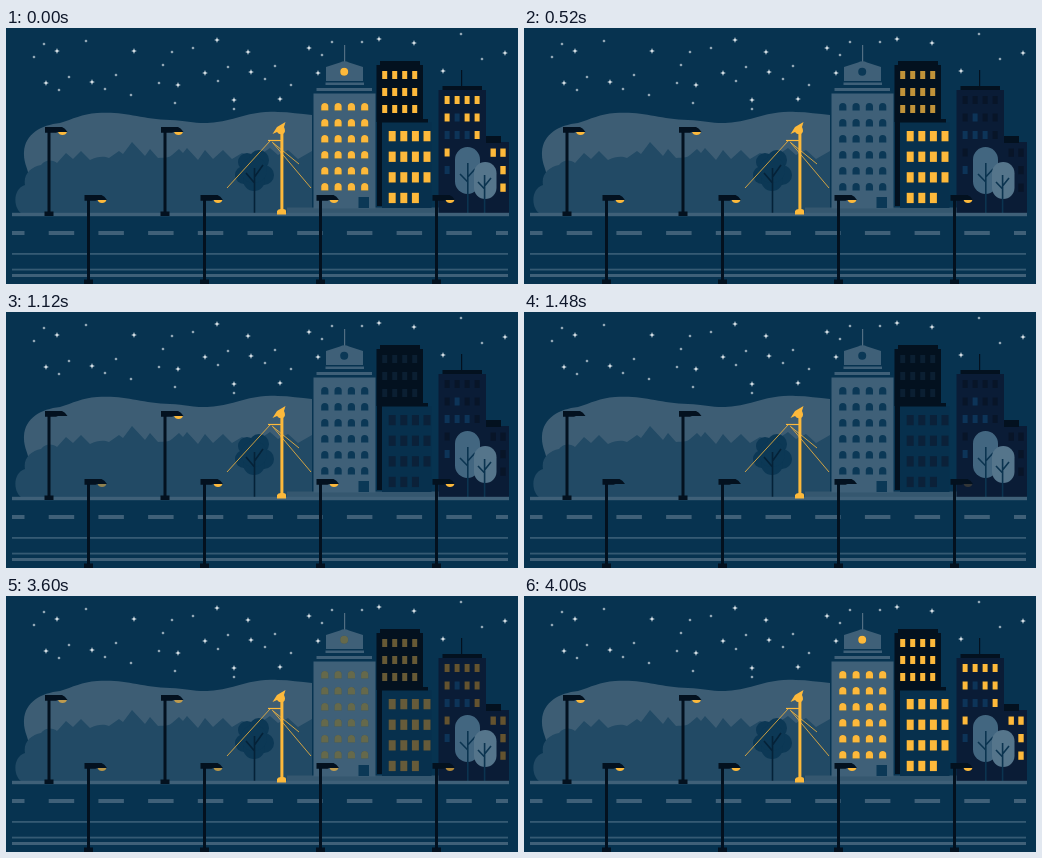
An HTML page for the animation above (4.8 s loop, 512 px wide and 256 px high).

```html
<!DOCTYPE html>
<html lang="en">
<head>
<meta charset="utf-8">
<title>City lights</title>
<style>
html, body { margin: 0; width: 100%; height: 100%; overflow: hidden; background: #073350; }
svg { display: block; width: 100vw; height: 100vh; }
</style>
</head>
<body>
<svg id="city" viewBox="0 0 512 256" xmlns="http://www.w3.org/2000/svg"></svg>
<script>
const LOOP = 4800, STEP = 40;
const C = {
  sky: '#073350', haze: '#3d5d74', hill: '#224a65', black: '#03111f',
  navy: '#0a1c36', gold: '#fdb93b', stone: '#3f6078'
};
const svg = document.getElementById('city');
const lights = [];

function add(tag, attrs) {
  const el = document.createElementNS(svg.namespaceURI, tag);
  for (const k in attrs) el.setAttribute(k, attrs[k]);
  return svg.appendChild(el);
}
const path = (d, fill, more) => add('path', { d, fill, ...more });
const line = (d, stroke, width) => path(d, 'none', { stroke, 'stroke-width': width });
const rect = (x, y, width, height, fill, rx = 0) => add('rect', { x, y, width, height, fill, rx });
const circle = (cx, cy, r, fill) => add('circle', { cx, cy, r, fill });
const ramp = (t, a, b) => Math.min(1, Math.max(0, (t - a) / (b - a)));

// Each light fades out between off and off + fade, and returns with its group.
function light(el, off, fade, lamp = false) {
  lights.push({ el, off, fade, lamp });
}
function pane(x, y, w, h, off, fade, dark) {
  rect(x, y, w, h, dark);
  light(rect(x, y, w, h, C.gold), off, fade);
}

function star(x, y, r) {
  const k = r * 0.25;
  path(`M${x} ${y - r}L${x + k} ${y - k}L${x + r} ${y}L${x + k} ${y + k}L${x} ${y + r}L${x - k} ${y + k}L${x - r} ${y}L${x - k} ${y - k}Z`, '#e3ebef');
}

function sky() {
  rect(0, 0, 512, 256, C.sky);
  const big = '51,23 128,23 211,12 303,20 373,11 408,15 499,25 437,43 40,55 86,54 172,57 199,45 245,44 228,72 274,71 312,45 242,24';
  const small = '38,16 80,13 166,24 187,20 326,14 316,27 356,14 455,6 476,31 28,29 63,49 53,62 110,47 99,61 125,67 157,37 153,55 169,75 222,39 212,53 269,38 259,51 228,81 285,57';
  [[big, 2.9], [small, 1.8]].forEach(([list, r]) =>
    list.split(' ').forEach(p => star(...p.split(',').map(Number), r)));
}

function hills() {
  path('M20 160C28 146 17 140 18 124C19 106 35 97 54 95C67 91 76 86 91 85C120 83 134 91 164 92C184 93 193 97 211 94C230 92 246 82 272 84C284 84 294 86 306 87V186H20Z', C.haze);
  path('M17 186C7 182 6 161 19 157C17 146 25 139 35 137C41 130 48 133 51 135L60 125L67 131L75 123L84 132C92 128 98 128 103 130L113 123L117 126L126 114L139 128L144 121L152 130C157 129 162 131 166 127L173 121L177 125L181 120L192 132L199 122L207 131L217 122L226 131L236 125L249 130L264 120L272 127L282 122L292 131L306 123V186Z', C.hill);
}

function park() {
  [[241, 134, 9], [253, 132, 10], [238, 147, 9], [258, 147, 10], [248, 152, 11], [248, 142, 13]]
    .forEach(([x, y, r]) => circle(x, y, r, '#0c3855'));
  line('M248.5 185V140M248.5 155L240 145M248.5 149L257 137', '#052238', 1.6);
}

function statue() {
  line('M264 113L221 160M266 114L293 136M267 115L305 160', C.gold, 0.8);
  line('M262 112.5H275', C.gold, 1.2);
  rect(274.4, 103, 3, 80, C.gold);
  path('M271 186.5V183Q272 181 275 181H277Q280 181 280 183V186.5Z', C.gold);
  path('M266.5 106L271 99L279.5 94L278 99Q280.5 104 277 106Q273 107 271 104Z', C.gold);
}

function tower() {
  rect(281, 179.5, 170, 7, '#35576f');
  rect(338, 17, 1.2, 18, '#526e82');
  path('M320 53V39L334 34.5Q338.5 32 343 34.5L357 39V53Z', C.stone);
  rect(319.5, 54.5, 38.5, 2.5, C.stone);
  rect(310.5, 60, 55.5, 3, C.stone);
  rect(307.5, 65.5, 62, 115, C.stone);
  rect(352.5, 169, 10.5, 11, '#0b3856');
  circle(338.2, 43.8, 4, '#0b3856');
  light(circle(338.2, 43.8, 4, C.gold), 320, 0);

  const late = [0, 3, 6, 9, 10, 15, 16, 23];
  for (let i = 0; i < 24; i++) {
    const x = 315.2 + 13.3 * (i % 4), y = 75 + 16 * Math.floor(i / 4);
    const d = `M${x} ${y + 7.5}V${y + 3.5}a3.6 3.5 0 0 1 7.2 0v4Z`;
    const k = late.indexOf(i);
    path(d, '#0b3856');
    light(path(d, C.gold), k < 0 ? 280 + 40 * (i * 7 % 3) : 440 + 40 * (k % 3), 0);
  }
}

function offices() {
  rect(374, 33, 40, 5, C.black);
  rect(370.5, 37, 46.5, 57, C.black);
  rect(371, 92, 6, 86, C.black);
  rect(376, 94, 49.5, 86, '#07304d');
  rect(376, 91, 46, 3.5, C.black);
  for (let r = 0; r < 3; r++)
    for (let c = 0; c < 4; c++)
      pane(376.2 + 10 * c, 43 + 17 * r, 5, 8, 480, 160, '#0b1f32');
  for (let i = 0; i < 15; i++)
    pane(382.7 + 11.6 * (i % 4), 103 + 20.6 * Math.floor(i / 4), 7, 10.3, 680, 160, '#0b2139');
}

function block() {
  rect(455, 42, 1.2, 17, C.black);
  rect(436.5, 58, 39.5, 5, C.black);
  rect(432.5, 62, 47.5, 123, C.navy);
  rect(480, 114, 23, 71, C.navy);
  rect(480, 108, 15, 7, C.black);
  const blue = '#0d3458';
  ['1111', '1011', '0001', '1', '0'].forEach((row, r) => [...row].forEach((on, c) => {
    const x = 438.6 + 10 * c, y = 68 + 17.5 * r;
    if (+on) pane(x, y, 5, 8, 320, 160, '#081528');
    else rect(x, y, 5, 8, blue);
  }));
  [[484.5, 120.5], [494.3, 120.5], [494.3, 138], [494.3, 155.5]]
    .forEach(([x, y]) => pane(x, y, 5.4, 8.3, 320, 160, '#081528'));
}

function trees() {
  rect(449, 119, 25, 47, '#426680', 12.5);
  line('M461.8 185V135M461.8 154L454 146M461.8 149L469 141', '#0b3450', 1.6);
  rect(468, 134, 22.5, 37, '#55758b', 11.2);
  line('M478.6 185V147M478.6 161L472 154M478.6 158L485 150', '#0b3450', 1.6);
}

function road() {
  rect(6, 184.8, 497, 3.4, C.stone);
  for (let i = 0; i < 11; i++) {
    const x = -7 + 49.7 * i, a = Math.max(6, x), b = Math.min(502, x + 25.5);
    rect(a, 203, b - a, 4, C.stone);
  }
  rect(6, 225, 496, 1.8, '#355a73');
  rect(6, 240.7, 496, 1.8, '#355a73');
  rect(6, 246, 496, 3, C.stone);
}

function lamp(x, top, foot, off) {
  const glow = path(`M${x + 9} ${top + 4.7}H${x + 18}Q${x + 17} ${top + 8} ${x + 13.5} ${top + 8}T${x + 9} ${top + 4.7}Z`, C.gold);
  light(glow, off, 120, true);
  rect(x - 1.5, top + 1, 3, foot - top - 1, C.black);
  rect(x - 4.5, foot - 4.5, 9, 4.5, C.black);
  path(`M${x - 4} ${top}H${x + 13}Q${x + 16} ${top + 1} ${x + 18.5} ${top + 5}H${x + 9}L${x + 7} ${top + 5.7}H${x - 4}Z`, C.black);
}

[sky, hills, park, tower, offices, block, trees, road, statue].forEach(draw => draw());
[[43, 99, 188], [82.5, 167, 256], [159, 99, 188], [198.5, 167, 256], [314.5, 167, 256], [430.5, 167, 256]]
  .forEach(([x, top, foot], i) => lamp(x, top, foot, 980 + 80 * i));

function level({ off, fade, lamp }, t) {
  const end = Math.min(t, 1480);
  const out = fade ? 1 - ramp(end, off, off + fade) : +(end < off);
  if (t < 3400) return out;
  const p = lamp ? ramp(t, 3360, 3920) : ramp(t, 3360, 4000);
  return Math.max(out, lamp ? p * (2 - p) : p);
}

const start = performance.now();
function render(now) {
  const t = Math.floor(Math.max(0, now - start) % LOOP / STEP) * STEP;
  lights.forEach(l => l.el.setAttribute('opacity', level(l, t)));
  requestAnimationFrame(render);
}
render(start);
</script>
</body>
</html>
```
